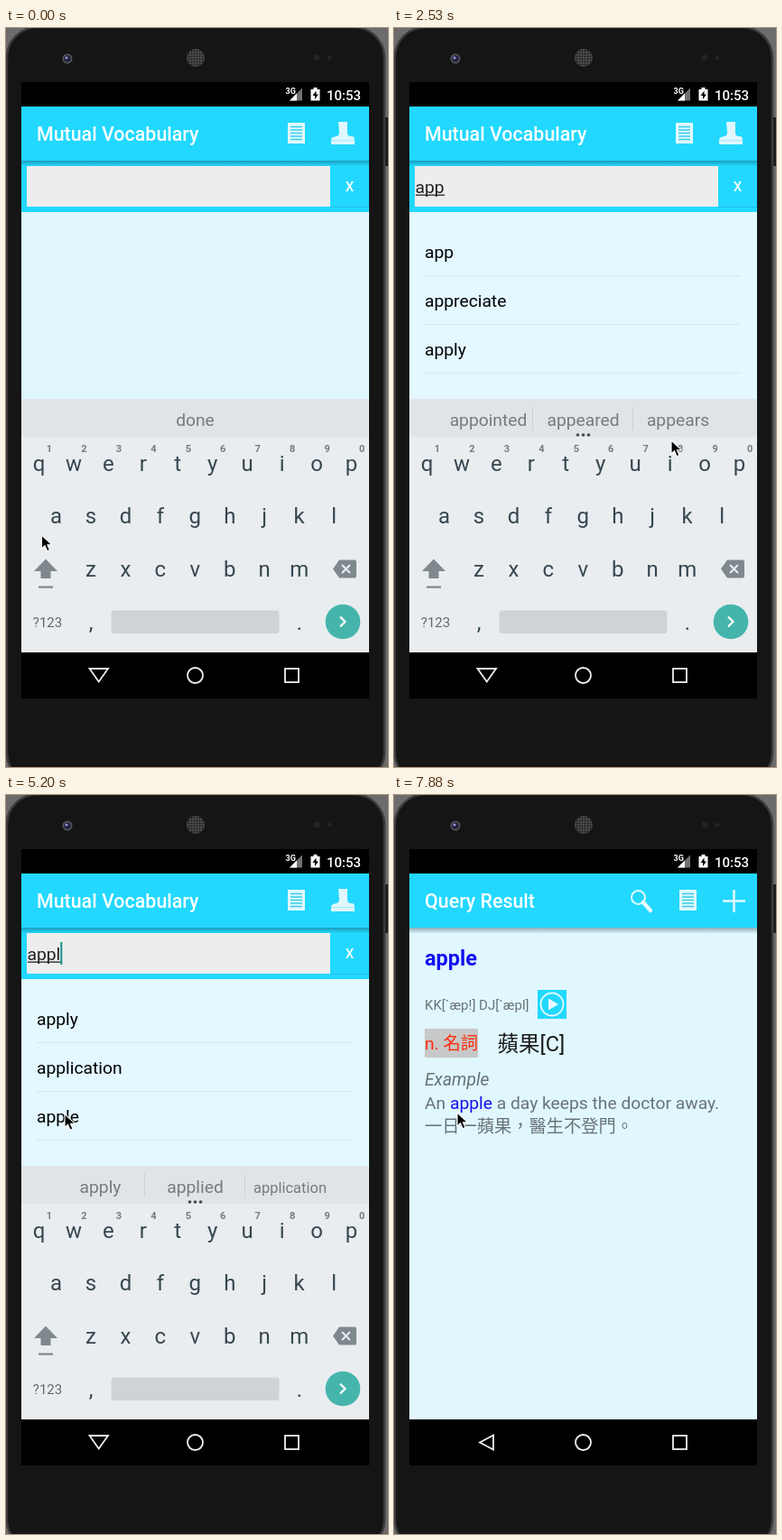
An HTML page that plays this animation: 423 px wide and 819 px high, repeating every 8000 ms.

```html
<!DOCTYPE html>
<html lang="en">
<head>
<meta charset="utf-8">
<title>Dictionary lookup</title>
<style>
  html, body { margin: 0; width: 100%; height: 100%; overflow: hidden; background: #6c6c6c; }
  svg { display: block; width: 423px; height: 819px; font: 19.25px Roboto, sans-serif; }
  .title { font-size: 21.4px; font-weight: 500; fill: #fff; }
  .mid { text-anchor: middle; }
  .letters { font-size: 24px; fill: #37474f; }
  .hints { font-size: 11px; font-weight: 700; fill: #737c80; }
  .strip { fill: #757b7e; }
  .cjk { font-family: Roboto, "Noto Sans CJK TC", "Noto Sans CJK", sans-serif; }
  .nav { fill: none; stroke: #f0f0f0; stroke-width: 1.8; }
</style>
</head>
<body>
<svg viewBox="0 0 423 819">
  <defs>
    <linearGradient id="shade" x2="0" y2="1">
      <stop stop-color="#13485a" stop-opacity=".42"/>
      <stop offset="1" stop-color="#13485a" stop-opacity="0"/>
    </linearGradient>
    <pattern id="mesh" width="3" height="3" patternUnits="userSpaceOnUse">
      <rect width="3" height="3" fill="#4b4b4b"/><circle cx="1.5" cy="1.5" r=".9" fill="#171717"/>
    </pattern>
    <clipPath id="screen"><rect x="17" y="87" width="385" height="621"/></clipPath>
    <g id="page" fill="#e2f8fd">
      <rect width="19" height="23"/>
      <path d="M3 4.5h13M3 8h13M3 11.5h13M3 15h13M3 18.5h13" stroke="#35cdec" stroke-width="1.3"/>
    </g>
  </defs>

  <!-- Phone body -->
  <rect width="423" height="819" fill="#6c6c6c"/>
  <rect x="419" y="99" width="4" height="54" fill="#1c1c1c"/>
  <rect x="1" y="-1" width="418" height="838" rx="34" fill="#151515" stroke="#3b3b3b" stroke-width="2.5"/>
  <circle cx="68" cy="34" r="5.5" fill="#54545c"/>
  <circle cx="68" cy="34" r="3.8" fill="#22223c"/>
  <circle cx="67" cy="33" r="1.5" fill="#9a9ae0"/>
  <circle cx="210" cy="33" r="10" fill="url(#mesh)"/>
  <g fill="#232323"><circle cx="344" cy="33" r="3.5"/><circle cx="358" cy="33" r="2.5"/></g>
  <rect x="17" y="60" width="385" height="683"/>

  <!-- Search screen -->
  <g id="search">
    <rect x="17" y="87" width="385" height="605" fill="#ededed"/>
    <rect id="listBack" x="17" y="204" width="385" height="207.5" fill="#e2f8ff"/>
    <rect x="17" y="87" width="385" height="117" fill="#22d8ff"/>
    <rect x="17" y="147" width="385" height="6" fill="url(#shade)"/>
    <text class="title" x="34" y="125">Mutual Vocabulary</text>
    <use href="#page" x="312" y="105"/>
    <path d="M368 104h10v12q0 3 3 4h2q3 0 3 4v5h-26v-5q0-3 4-3.500q5-.5 5-5z" fill="#dff7fd"/>
    <path d="M360 124.500h26" stroke="#a5e9f8" stroke-width="1"/>
    <rect x="23" y="153" width="336" height="45" fill="#ededed"/>
    <path d="M359 198.500h43" stroke="#1fc0e2"/>
    <text class="mid" x="380.500" y="181" font-size="15" font-weight="500" fill="#fff">X</text>
    <text id="query" x="23.500" y="183" fill="#222"></text>
    <rect id="underline" x="24" y="184.500" height="1.3" fill="#222"/>
    <rect id="caret" y="163" width="2" height="25" fill="#159488"/>
    <g id="list"></g>
  </g>

  <!-- Keyboard -->
  <g id="keyboard">
    <rect x="17" y="411.500" width="385" height="281" fill="#e9edf0"/>
    <rect x="17" y="411.500" width="385" height="41.500" fill="#e1e4e7"/>
    <text id="done" class="strip mid" x="209.500" y="441">done</text>
    <g id="hintsBar">
      <path d="M153.500 420v26M264.500 420v26" stroke="#cdd1d4"/>
      <g fill="#444b4f"><circle cx="203.500" cy="451" r="1.8"/><circle cx="209.500" cy="451" r="1.8"/><circle cx="215.500" cy="451" r="1.8"/></g>
      <g id="words" class="strip mid"></g>
    </g>
    <g id="press">
      <rect x="-18" y="-28" width="36" height="56" fill="#d5dadd"/>
      <rect x="-18" y="-84" width="36" height="56" rx="2" fill="#f3f5f6"/>
      <text id="pressLetter" class="mid" y="-48" font-size="28" fill="#37474f"></text>
    </g>
    <g id="letters" class="letters mid"></g>
    <g id="hints" class="hints mid"></g>
    <g fill="#7f898d">
      <path d="M44 588.500l13 13.500h-7.500v8h-11v-8h-7.500zM36 618.500h16v2.200h-16z"/>
      <path d="M362 599.500l7-10h17q2 0 2 2v16q0 2-2 2h-17z"/>
    </g>
    <path d="M372 595l9 9m0-9l-9 9" stroke="#e9edf0" stroke-width="2"/>
    <text class="mid" x="46" y="664" font-size="15" fill="#5f6a6f">?123</text>
    <rect x="116.500" y="645.500" width="186" height="25.500" rx="3" fill="#cfd3d6"/>
    <circle cx="373" cy="658" r="19.300" fill="#45b5ab"/>
    <path d="M370 652.500l5.500 5.500l-5.500 5.500" fill="none" stroke="#fff" stroke-width="2.200"/>
  </g>
  <rect x="17" y="692" width="385" height="51"/>

  <!-- Result screen -->
  <g clip-path="url(#screen)">
    <g id="result">
      <rect x="17" y="60" width="385" height="27"/>
      <rect x="17" y="87" width="385" height="605" fill="#e0f7fe"/>
      <rect x="17" y="87" width="385" height="60" fill="#22d8ff"/>
      <rect x="17" y="147" width="385" height="7" fill="url(#shade)"/>
      <text class="title" x="34" y="125">Query Result</text>
      <g fill="none" stroke="#e2f8fd">
        <circle cx="270.500" cy="113.500" r="7.500" stroke-width="2"/>
        <path d="M276 119l8 9" stroke-width="4.500" stroke-linecap="round"/>
        <path d="M364 117.500h25M376.500 105v25" stroke-width="2.500"/>
      </g>
      <use href="#page" x="316" y="105"/>
      <text x="34" y="188.500" font-size="23.500" font-weight="700" fill="#1010f0">apple</text>
      <g id="details" class="cjk" fill="#687378" lang="zh-TW">
        <text x="34" y="238" font-size="15">KK[`æp!] DJ[`æpl]</text>
        <rect x="159" y="216" width="32" height="32" fill="#22d8ff"/>
        <circle cx="175" cy="232" r="12.500" fill="none" stroke="#e6faff" stroke-width="1.800"/>
        <path d="M171 225.500l11 6.500l-11 6.500z" fill="#e6faff"/>
        <rect x="34" y="259" width="59" height="32" fill="#c8c8c8"/>
        <text x="34" y="282" fill="#ff2a0a">n. 名詞</text>
        <text x="114.500" y="284" font-size="23.500" fill="#1b1b1b">蘋果[C]</text>
        <text x="34" y="322" font-style="italic">Example</text>
        <text x="34" y="348">An <tspan fill="#1010f0">apple</tspan> a day keeps the doctor away.</text>
        <text x="34" y="374">一日一蘋果，醫生不登門。</text>
      </g>
    </g>
  </g>

  <!-- System bars -->
  <g fill="#fff">
    <text x="309.500" y="73" font-size="9" font-weight="700">3G</text>
    <path d="M314 80.500l14-14v14z" fill="#707070"/>
    <path d="M314 80.500l8-8v8z"/>
    <path d="M337.500 68h3v-2h4v2h3v12.500h-10z"/>
    <path d="M343.500 69.500l-4 5.500h2.500v4l4-5.500h-2.500z" fill="#000"/>
    <text x="355" y="79.500" font-size="15" font-weight="500">10:53</text>
  </g>
  <g class="nav">
    <path id="back"/>
    <circle cx="209.500" cy="717.500" r="8.500"/>
    <rect x="309" y="710" width="15" height="15"/>
  </g>
  <path id="pointer" d="M0 0v15l3.500-3.300l2.600 6l2.900-1.200l-2.600-5.800h4.900z" stroke="#fff" stroke-width="1.100"/>
</svg>
<script>
const LOOP = 8000;
const $ = id => document.getElementById(id);
const show = (id, on) => $(id).setAttribute('visibility', on ? 'inherit' : 'hidden');
const lastBefore = (rows, t) => rows.filter(row => row[0] <= t).pop();

// Screen refreshes: first, last, count
const ticks = [0];
for (const [from, to, count] of [
  [150, 1190, 8], [1340, 1340, 1], [1640, 2680, 8], [2830, 3860, 8],
  [4010, 5050, 8], [5200, 5790, 5], [7290, 7440, 2], [7730, 7880, 2]
]) {
  for (let i = 0; i < count; i++) {
    ticks.push(Math.round((from + (to - from) * i / Math.max(1, count - 1)) / 10) * 10);
  }
}

const typed = [[0, ''], [440, 'a'], [1190, 'ap'], [1780, 'app'], [2970, 'appl']];
const results = [
  [0, [], []],
  [590, ['a', 'about', 'after'], ['and', 'a', 'are']],
  [1340, ['ap', 'app', 'appreciate'], ['April', 'appeared', 'appointed']],
  [1930, ['app', 'appreciate', 'apply'], ['appointed', 'appeared', 'appears']],
  [3120, ['apply', 'application', 'apple'], ['apply', 'applied', 'application']]
];
const presses = [
  [290, 590, 'a', 55, 541], [1040, 1340, 'p', 382, 483],
  [1640, 1930, 'p', 382, 483], [2820, 3120, 'l', 363.5, 541]
];
const pointerPath = [
  [0, 39.5, 562], [290, 52, 543], [590, 52, 543], [1040, 376, 476], [1930, 376, 476],
  [2530, 307, 457], [2680, 345, 531], [2830, 367, 537], [3120, 367, 537],
  [3860, 130, 379], [4310, 118.5, 371], [4600, 44, 362], [5050, 65, 353.5],
  [7730, 65, 353.5], [7880, 70, 352], [LOOP, 70, 352]
];

const keyRows = [['qwertyuiop', 36.5, 491], ['asdfghjkl', 55.5, 549], ['zxcvbnm', 94, 608]];
$('letters').innerHTML = keyRows.map(([row, x, y]) => [...row].map((key, i) =>
  `<text x="${x + i * 38.45}" y="${y}">${key}</text>`).join('')).join('') +
  '<text x="94" y="667">,</text><text x="325" y="667">.</text>';
$('hints').innerHTML = [...'1234567890'].map((digit, i) =>
  `<text x="${48 + i * 38.45}" y="470">${digit}</text>`).join('');

function pointerAt(t) {
  const next = Math.max(1, pointerPath.findIndex(point => point[0] > t));
  const [t0, x0, y0] = pointerPath[next - 1], [t1, x1, y1] = pointerPath[next];
  const p = (t - t0) / (t1 - t0);
  return [x0 + (x1 - x0) * p, y0 + (y1 - y0) * p];
}

function drawInput(t) {
  const [since, text] = lastBefore(typed, t);
  $('query').textContent = text;
  const width = text ? $('query').getComputedTextLength() : 0;
  $('underline').setAttribute('width', width);
  $('caret').setAttribute('x', 23.5 + width);
  show('caret', text && t < 7290 && (t >= 4980 || (t - since) % 1000 < 500));
}

function drawResults(t) {
  const [, items, words] = lastBefore(results, t);
  $('list').innerHTML = items.map((item, i) =>
    `<text x="34" y="${255 + i * 54}">${item}</text>` +
    `<path d="M34 ${274.5 + i * 54}h350" stroke="#d3e8ef"/>`).join('');
  $('words').innerHTML = words.map((word, i) =>
    `<text x="${104.5 + i * 105}" y="441"${word.length > 10 ? ' font-size="16.5"' : ''}>${word}</text>`).join('');
  $('listBack').setAttribute('fill', items.length ? '#e3f8ff' : '#e0f7fe');
  show('done', !items.length);
  show('hintsBar', items.length);
}

function drawKeyboard(t) {
  const press = presses.find(([from, to]) => t >= from && t < to);
  show('press', press);
  if (press) {
    const [, , key, x, y] = press;
    $('press').setAttribute('transform', `translate(${x} ${y})`);
    $('pressLetter').textContent = key;
  }
  const leaving = t >= 5480;
  show('keyboard', t < 5630);
  $('keyboard').setAttribute('opacity', leaving ? .5 : 1);
  $('keyboard').setAttribute('transform', `translate(0 ${leaving ? 30 : 0})`);
  $('back').setAttribute('d', leaving ? 'M95 717.5l15-8v16z' : 'M92.500 710h20.500l-10.250 14.500z');
}

function draw(t) {
  drawInput(t);
  drawResults(t);
  drawKeyboard(t);
  const entering = t < 7440;
  show('result', t >= 7290);
  $('result').setAttribute('opacity', entering ? .82 : 1);
  $('result').setAttribute('transform', `translate(0 ${entering ? 16 : 0})`);
  show('details', t >= 7730);
  $('pointer').setAttribute('transform', `translate(${pointerAt(t)})`);
}

let shown = -1;
function frame() {
  const now = performance.now() % LOOP;
  const tick = ticks.filter(time => time <= now).pop();
  if (tick !== shown) draw(shown = tick);
  requestAnimationFrame(frame);
}
frame();
</script>
</body>
</html>
```
